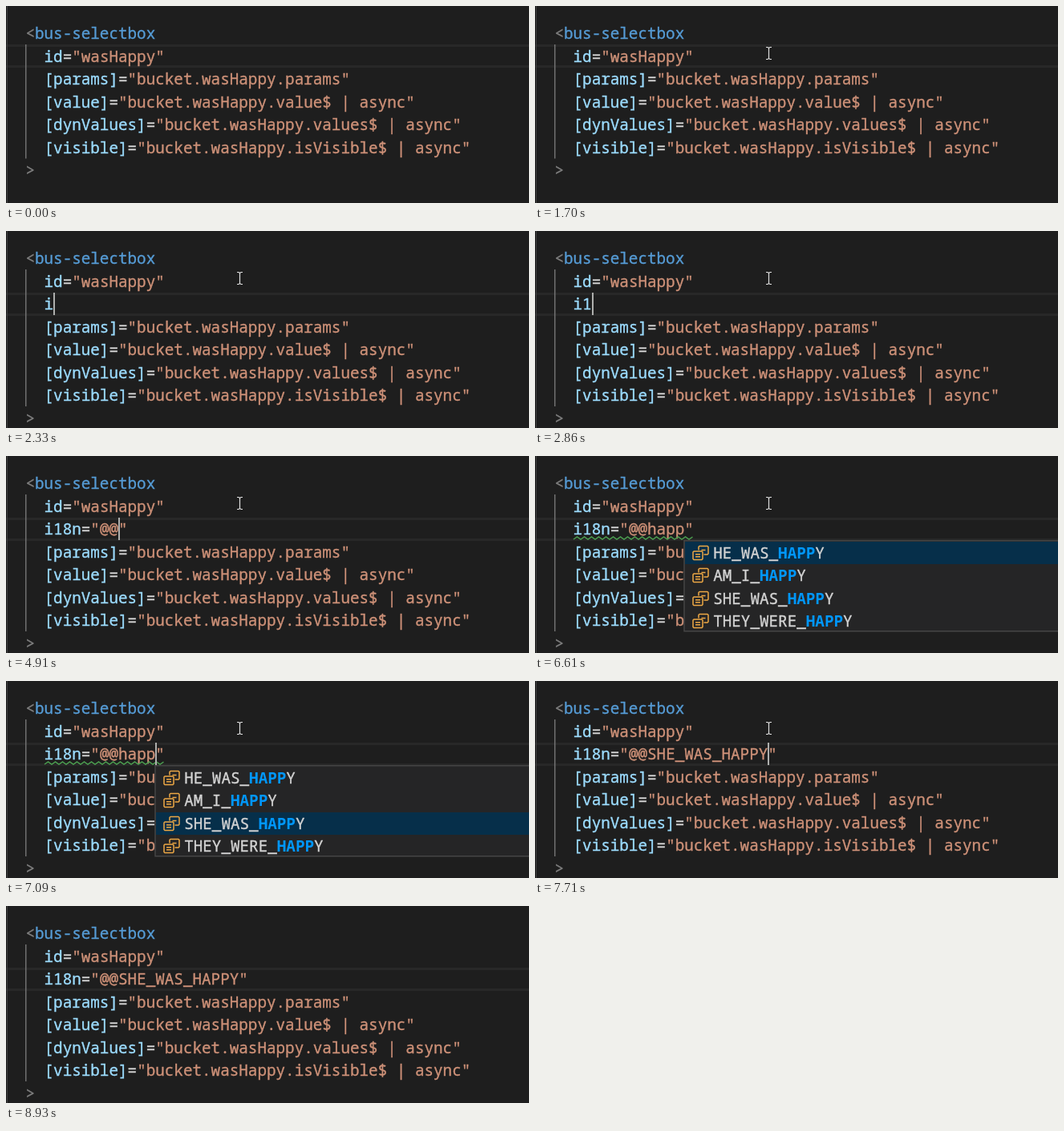
An HTML page that plays this animation: 652 px wide and 246 px high, repeating every 9490 ms.

```html
<!DOCTYPE html>
<html lang="en">
<head>
<meta charset="utf-8">
<title>Code completion</title>
<style>
  html, body { margin: 0; width: 100%; height: 100%; overflow: hidden; background: #1e1e1e; }
  svg { display: block; width: 652px; height: 246px; }
  text { font: 19.27px "Noto Sans Mono", monospace; white-space: pre; font-variant-ligatures: none; }
  tspan { fill: currentColor; stroke: currentColor; stroke-width: .35px; }
  tspan.match { font-weight: bold; stroke: none; }
</style>
</head>
<body>
<svg id="stage" viewBox="0 0 652 246"></svg>
<script>
const LOOP = 9490, LEFT = 24.4, CHAR = 11.56, PITCH = 28.5;
const COLOR = {
  bracket: '#808080', tag: '#569cd6', attr: '#9cdcfe', plain: '#d4d4d4',
  string: '#ce9178', match: '#0097fb', icon: '#eda845'
};

const BINDINGS = [
  '[params]="bucket.wasHappy.params"',
  '[value]="bucket.wasHappy.value$ | async"',
  '[dynValues]="bucket.wasHappy.values$ | async"',
  '[visible]="bucket.wasHappy.isVisible$ | async"'
];

// Each track is a list of [start time, value]; values hold until the next entry.
const TYPED = [
  [0, null], [1850, ''], [2250, 'i'], [2860, 'i1'], [2950, 'i18'], [3660, 'i18n'],
  [3960, 'i18n='], [4360, 'i18n="'], [4740, 'i18n="@'], [4910, 'i18n="@@'],
  [5290, 'i18n="@@h'], [5450, 'i18n="@@ha'], [5530, 'i18n="@@hap'],
  [6150, 'i18n="@@happ'], [7470, 'i18n="@@SHE_WAS_HAPPY']
];
const CARET = [
  [0, false], [210, true], [710, false], [1220, true], [1700, false], [1850, true],
  [2710, false], [2860, true], [3500, false], [3660, true], [6090, false], [6150, true],
  [6610, false], [7090, true], [7950, false], [8470, true], [8930, false]
];
const SELECTED = [[0, -1], [5610, 0], [6730, 1], [6910, 2], [7470, -1]];
const SQUIGGLE = [[0, false], [5370, true], [7560, false]];
const UNQUOTED = [[0, false], [4050, true], [4360, false]];
const MOUSE_IN = [[210, 484, 238], [500, 430, 120], [800, 345, 24], [1050, 298, 45], [1220, 291, 59]];
const MOUSE_OUT = [[7950, 291, 59], [8130, 320, 120], [8390, 370, 262]];

// Square brackets enclose the matched letters.
const ITEMS = {
  hap: ['HE_WAS_[HAP]PY', 'AM_I_[HAP]PY', 'SHE_WAS_[HAP]PY', 'THEY_WERE_[HAP]PY', 'externalLinks[H]ome[Pa]ge'],
  happ: ['HE_WAS_[HAPP]Y', 'AM_I_[HAPP]Y', 'SHE_WAS_[HAPP]Y', 'THEY_WERE_[HAPP]Y']
};

const at = (track, t) => track.findLast(step => step[0] <= t)[1];
const colX = col => LEFT + col * CHAR;
const rowY = (row, origin) => Math.round(origin + row * PITCH);
const escapeText = s => s.replace(/&/g, '&amp;').replace(/</g, '&lt;');
const rect = (x, y, w, h, fill, extra = '') =>
  `<rect x="${x}" y="${y}" width="${w}" height="${h}" fill="${fill}" ${extra}/>`;
const span = (s, color, extra = '') => `<tspan color="${color}" ${extra}>${escapeText(s)}</tspan>`;
const label = (x, y, spans) => `<text x="${x}" y="${y}">${spans}</text>`;
const codeLine = (row, col, spans) => label(colX(col), rowY(row, 41), spans);

function attribute(source) {
  const [, name, equals, value] = source.match(/^([^=]*)(=?)(.*)$/);
  return span(name, COLOR.attr) + span(equals, COLOR.plain) + span(value, COLOR.string);
}

function squiggle(from, to) {
  let d = `M${from} 104`;
  for (let x = from, up = true; x + 4.5 <= to; x += 4.5, up = !up) d += `l4.5 ${up ? -3 : 3}`;
  return `<path d="${d}" fill="none" stroke="#4b9e4f" stroke-width="1.5"/>`;
}

function icon(x, y) {
  return `<g transform="translate(${x} ${y})" fill="none" stroke="${COLOR.icon}" stroke-width="1.5" stroke-linejoin="round">
    <path d="M8 5.5V1.5L9 .5H19L20 1.5V10L19 11H14.5M11.5 5.5H16.5"/>
    <path d="M1 8L2 7H12L13 8V16.5L12 17.5H2L1 16.5ZM4 10.8H10M4 13.8H10"/></g>`;
}

function popup(items, selected, x) {
  const rows = items.map((item, i) => {
    const y = rowY(i, 106.5);
    const spans = item.split(/[\[\]]/).map((part, n) =>
      n % 2 ? span(part, COLOR.match, 'class="match"') : span(part, COLOR.plain)).join('');
    return (i === selected ? rect(x + 1, y, 660 - x, 28, '#062f4a') : '') +
      icon(x + 10, y + 5) + label(x + 36.2, y + 21, spans);
  });
  const frame = rect(x, 105.75, 660 - x, items.length * PITCH - 1, '#252526',
    'stroke="#454545" stroke-width="1.5"');
  return frame + rows.join('');
}

function along(path, t) {
  const next = path.findIndex(p => p[0] > t);
  if (next < 1) return path[path.length - 1];
  const a = path[next - 1], b = path[next];
  const k = (t - a[0]) / (b[0] - a[0]);
  return a.map((v, i) => v + (b[i] - v) * k);
}

function mouse(t) {
  if (t < 210 || t >= 8390) return '';
  const path = t < 7950 ? MOUSE_IN : MOUSE_OUT;
  const start = path[0][0], tick = 1010 / 12;
  const stepped = start + Math.floor((t - start) / tick + 1e-6) * tick;
  const [, x, y] = along(path, t < 1220 || t >= 7950 ? stepped : t);
  return `<path transform="translate(${Math.round(x)} ${Math.round(y)})" fill="none" stroke="#e0e0e0"
    stroke-width="1.2" d="M-3 -7.5H-1L.5 -6.5L2 -7.5H4M.5 -6.5V6.5M-3 7.5H-1L.5 6.5L2 7.5H4"/>`;
}

function picture(t) {
  const typed = at(TYPED, t), inserted = typed !== null;
  const top = rowY(inserted ? 1 : 0, 48);
  const firstBinding = inserted ? 3 : 2;
  const caretCol = inserted ? 2 + typed.length : 15;
  const selected = at(SELECTED, t);
  const quoted = inserted && typed.includes('"');
  const parts = [
    rect(0, top, 652, 3, '#282828'),
    rect(0, top + 26, 652, 3, '#282828'),
    rect(1, 0, 1, 246, '#404040'),
    rect(24, 48, 1.5, (firstBinding + 3) * PITCH, '#707070'),
    codeLine(0, 0, span('<', COLOR.bracket) + span('bus-selectbox', COLOR.tag)),
    codeLine(1, 2, attribute('id="wasHappy"'))
  ];
  if (inserted) parts.push(codeLine(2, 2, attribute(typed + (quoted ? '"' : ''))));
  BINDINGS.forEach((source, i) => parts.push(codeLine(firstBinding + i, 2,
    i === 0 && at(UNQUOTED, t) ? span(source, COLOR.string) : attribute(source))));
  parts.push(codeLine(firstBinding + 4, 0, span('>', COLOR.bracket)));
  if (at(SQUIGGLE, t)) parts.push(squiggle(48, colX(caretCol + 1)));
  if (selected >= 0) parts.push(popup(ITEMS[typed.slice(8)], selected, Math.round(colX(caretCol))));
  if (at(CARET, t)) parts.push(rect(Math.round(colX(caretCol)), top, 2, 28, '#aeafad'));
  parts.push(mouse(t));
  return parts.join('');
}

const stage = document.getElementById('stage');
const start = performance.now();
let shown = '';

function draw() {
  const markup = picture((performance.now() - start) % LOOP);
  if (markup !== shown) stage.innerHTML = shown = markup;
  requestAnimationFrame(draw);
}
draw();
</script>
</body>
</html>
```
